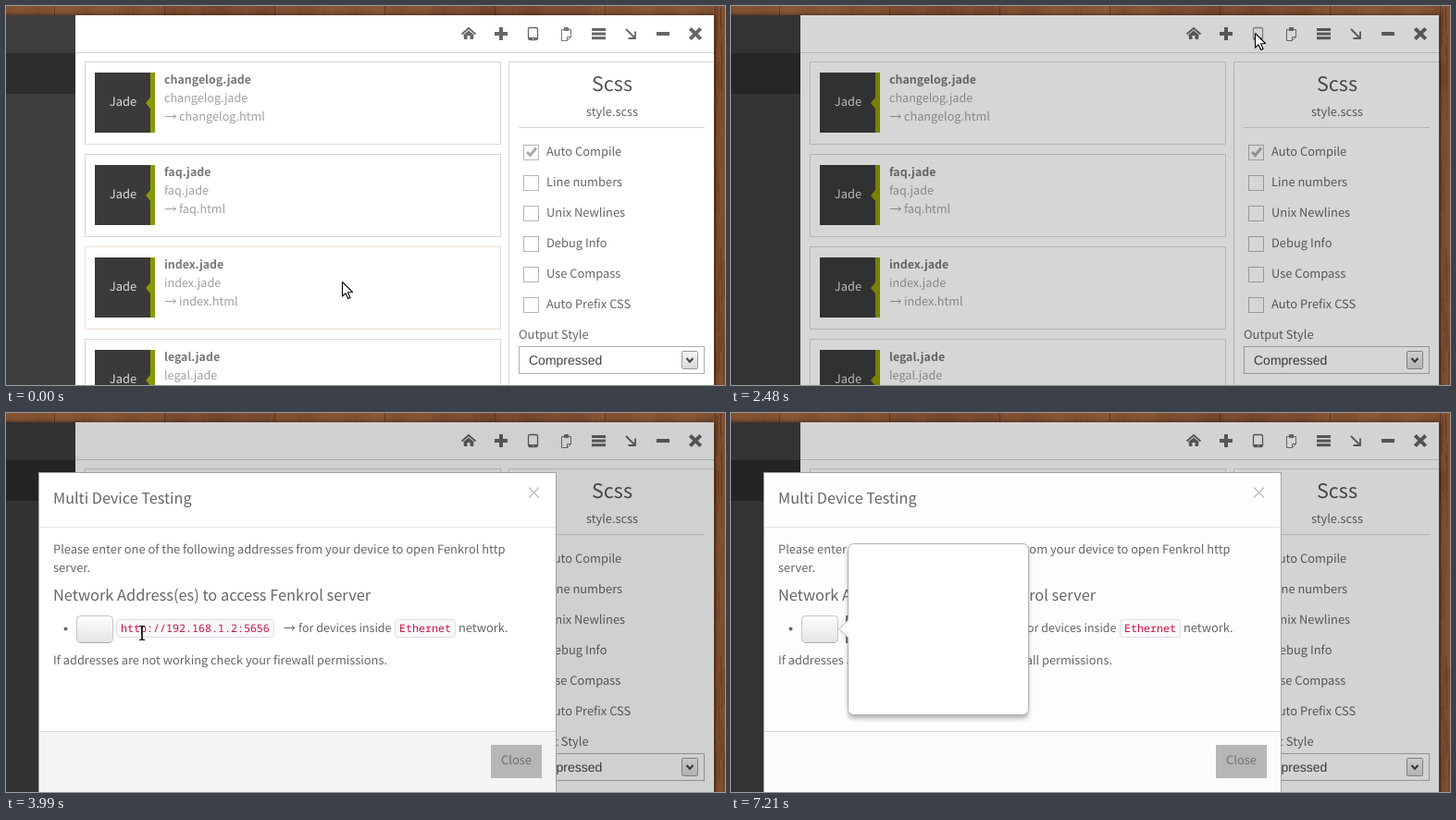
An HTML page with a canvas that plays this animation: 777 by 410 pixels, repeating every 7.29 s.

```html
<!DOCTYPE html>
<html lang="en">
<head>
<meta charset="utf-8">
<title>Multi Device Testing</title>
<style>
html, body { margin: 0; width: 100%; height: 100%; overflow: hidden; background: #6b4026; }
canvas { display: block; }
</style>
</head>
<body>
<canvas id="stage" width="777" height="410"></canvas>
<script>
const W = 777, H = 410, LOOP = 7290;
const SANS = '"Source Sans Pro", "Noto Sans CJK JP", "Noto Sans CJK SC", "Noto Sans CJK", "Noto Sans", sans-serif';
const MONO = '"Noto Sans Mono", "DejaVu Sans Mono", monospace';
const ARIAL = '"Liberation Sans", Arial, sans-serif';
const BODY = 12.9, GREY = '#666', RULE = '#d6d6d6';

// When things happen, in ms
const MOVE = 990, STEP = 135, DIM = 2355, OPEN = 2560, DRAG = 4245, DROP = 4650, POPUP = 5280, BLUR = 7200;

// Turning points of the pointer: time, x, y
const PATH = [[900, 363, 298], [1280, 375, 295], [1530, 624, 136], [1800, 598, 31], [2070, 566, 29],
  [2620, 566, 29], [2745, 567, 40], [3130, 328, 251], [3420, 104, 242], [3690, 217, 241],
  [3960, 147, 238], [DRAG, 124, 230], [DROP, 346, 238], [5070, 102, 236], [5450, 102, 236],
  [5880, 199, 252], [6200, 214, 255], [6640, 538, 398], [6780, 600, 440]];

const makeLayer = c => {
  c.width = W; c.height = H;
  return c.getContext('2d');
};
const stage = makeLayer(document.getElementById('stage'));
const layer = makeLayer(document.createElement('canvas'));
const desk = makeLayer(document.createElement('canvas'));
let g = stage;

const ramp = (t, from, span) => Math.max(0, Math.min(1, (t - from) / span));
const inside = (p, x, y, w, h) => p.x >= x && p.x < x + w && p.y >= y && p.y < y + h;

function rect(x, y, w, h, color) {
  g.fillStyle = color;
  g.fillRect(x, y, w, h);
}
function frame(x, y, w, h, color) {
  g.strokeStyle = color;
  g.lineWidth = 1;
  g.strokeRect(x + .5, y + .5, w - 1, h - 1);
}
function rounded(x, y, w, h, r, fill, stroke, width = 1) {
  g.beginPath();
  g.roundRect(x + .5, y + .5, w - 1, h - 1, r);
  g.lineWidth = width;
  if (fill) { g.fillStyle = fill; g.fill(); }
  if (stroke) { g.strokeStyle = stroke; g.stroke(); }
}
function trace(points) {
  g.beginPath();
  points.forEach(([x, y]) => g.lineTo(x, y));
}
function poly(points, color) {
  trace(points);
  g.closePath();
  g.fillStyle = color;
  g.fill();
}
function line(points, color, width = 1) {
  trace(points);
  g.strokeStyle = color;
  g.lineWidth = width;
  g.stroke();
}
function cross(x, y, r, color, width) {
  line([[x - r, y - r], [x + r, y + r]], color, width);
  line([[x + r, y - r], [x - r, y + r]], color, width);
}
function slope(y0, y1, from, to) {
  const s = g.createLinearGradient(0, y0, 0, y1);
  s.addColorStop(0, from);
  s.addColorStop(1, to);
  return s;
}
function text(str, x, y, color = GREY, size = BODY, opt = {}) {
  g.font = `${opt.weight || 400} ${size}px ${opt.font || SANS}`;
  g.textAlign = opt.align || 'left';
  g.fillStyle = color;
  g.fillText(str, x, y);
}
function arrow(x, y, color) {
  line([[x, y + .5], [x + 11.5, y + .5]], color);
  line([[x + 8.5, y - 2], [x + 11.5, y + .5], [x + 8.5, y + 3]], color);
}
// Draw a group on its own layer and blend it as one.
function fade(alpha, dy, paint) {
  if (alpha <= 0) return;
  g = layer;
  g.clearRect(0, 0, W, H);
  g.save();
  g.translate(0, dy);
  paint();
  g.restore();
  g = stage;
  g.globalAlpha = alpha;
  g.drawImage(layer.canvas, 0, 0);
  g.globalAlpha = 1;
}

function paintDesk() {
  g = desk;
  let seed = 7;
  const rnd = () => (seed = (seed * 16807) % 2147483647) / 2147483647;
  for (let x = 0; x < W; x++) {
    const v = Math.sin(x * .02) * 7 + Math.sin(x * .13) * 4 + rnd() * 6;
    rect(x, 0, 1, H, `rgb(${124 + v},${76 + v * .8},${47 + v * .6})`);
    if (x % 119 === 52) rect(x, 0, 1, H, 'rgba(45,20,8,.4)');
  }
  for (let i = 0; i < 60; i++) {
    rect(766 + rnd() * 11, rnd() * H, 1, 10 + rnd() * 40, `rgba(50,24,10,${rnd() * .3})`);
  }
  g.shadowColor = 'rgba(0,0,0,.6)';
  g.shadowBlur = 5;
  rect(-20, 10, 785, 440, '#fff');
  g.shadowBlur = 0;
  rect(0, 10, 75, 400, '#3d3d3d');
  rect(0, 51, 75, 44, '#2c2c2c');
  g = stage;
}

function toolbar(p) {
  const tint = (x, color) => inside(p, x - 15, 15, 30, 30) ? '#959595' : color;
  // house
  line([[492.5, 30.5], [500, 24], [507.5, 30.5]], GREY, 1.8);
  poly([[494.5, 31], [500, 26.5], [505.5, 31], [505, 36], [495, 36]], GREY);
  rect(498.5, 32, 3, 4, '#fff');
  // plus
  rect(528, 28, 14, 4, GREY);
  rect(533, 23, 4, 14, GREY);
  // tablet
  rounded(564, 23, 11, 14, 1.5, null, tint(570, GREY), 1.3);
  rect(565, 34, 9, 3, tint(570, GREY));
  rect(569, 35, 1.5, 1, '#fff');
  // clipboard
  const clip = tint(605, '#777');
  line([[603, 25.5], [600.5, 25.5], [600.5, 37.5], [606.5, 37.5], [610.5, 33.5], [610.5, 25.5], [608, 25.5]], clip);
  line([[606.5, 37.5], [606.5, 33.5], [610.5, 33.5]], clip);
  rect(603, 23, 5, 4, clip);
  // menu, arrow, minimise, close
  for (let i = 0; i < 3; i++) rect(633, 24 + i * 4.6, 15, 3, GREY);
  line([[670, 25], [679.5, 34.5]], GREY, 1.8);
  line([[680, 27.5], [680, 35], [672.5, 35]], GREY, 1.8);
  rect(703, 28, 14, 4, GREY);
  cross(745, 30, 5.7, GREY, 4);
}

function card(name, y, p) {
  frame(85, y, 450, 90, inside(p, 85, y, 450, 90) ? '#f1ddd2' : RULE);
  rect(96, y + 12, 60, 65, '#3a3a3a');
  rect(156, y + 12, 5, 65, '#8a9a05');
  poly([[156, y + 39], [151, y + 45], [156, y + 51]], '#8a9a05');
  text('Jade', 126.5, y + 48, '#ddd', BODY, { align: 'center' });
  text(name + '.jade', 171, y + 24, '#777', 12.4, { weight: 600 });
  text(name + '.jade', 171, y + 44, '#a0a0a0', 12.6);
  arrow(172, y + 59, '#a0a0a0');
  text(name + '.html', 187, y + 64, '#a0a0a0', 12.7);
}

function sidePanel() {
  line([[765, 60.5], [543.5, 60.5], [543.5, 410]], RULE);
  text('Scss', 655, 92, '#555', 21.5, { align: 'center' });
  text('style.scss', 655, 119, GREY, 12.8, { align: 'center' });
  rect(554, 131, 201, 1, RULE);
  ['Auto Compile', 'Line numbers', 'Unix Newlines', 'Debug Info', 'Use Compass', 'Auto Prefix CSS']
    .forEach((label, i) => {
      frame(559, 150 + i * 33, 17, 17, '#b5b5b5');
      text(label, 584, 162 + i * 33);
    });
  line([[563, 158], [566.5, 161.5], [573, 153.5]], '#aaa', 3);
  text('Output Style', 554, 360);
  frame(554, 368, 201, 30, '#b0b0b0');
  text('Compressed', 565, 388, '#444', 14, { font: ARIAL });
  rounded(730, 373, 18, 20, 1, slope(374, 393, '#f4f4f4', '#d8d8d8'), '#999');
  line([[735.5, 381], [739, 385], [742.5, 381]], '#444', 2);
}

function appWindow(p) {
  rect(75, 50, 690, 1, RULE);
  toolbar(p);
  ['changelog', 'faq', 'index', 'legal'].forEach((name, i) => card(name, 60 + i * 100, p));
  sidePanel();
}

function chip(str, x, w) {
  rounded(x, 223, w, 20, 3, '#f8f8fa', '#dedee4');
  text(str, x + 5, 237, '#c8103f', 11.67, { font: MONO });
}

function modal(marked, hover, focused) {
  rect(35, 64, 560, 347, focused ? '#fff' : '#fdfdfd');
  rect(36, 345, 558, 66, focused ? '#f4f4f4' : '#fbfbfb');
  rect(36, 123, 558, 1, '#e5e5e5');
  rect(36, 344, 558, 1, RULE);
  frame(35, 64, 560, 347, '#a3a3a3');
  text('Multi Device Testing', 51, 98, GREY, 16.2);
  cross(570.5, 86, 5.5, '#bbb', 1.3);

  text('Please enter one of the following addresses from your device to open Fenkrol http', 51, 152);
  text('server.', 51, 172);
  text('Network Address(es) to access Fenkrol server', 51, 203, GREY, 16.4);

  rounded(62, 231, 5, 5, 2, GREY);
  rounded(76, 219, 40, 30, 4, hover ? slope(219, 249, '#e9e9e9', '#dcdcdc') : slope(219, 249, '#fff', '#e4e4e4'), '#c4c4c4');
  rect(80, 248, 32, 1, '#aaa');

  const url = 'http://192.168.1.2:5656';
  chip(url, 119, 171);
  g.save();
  g.beginPath();
  g.rect(124, 219, marked, 30);
  g.clip();
  rect(124, 219, marked, 30, focused ? '#3797fd' : '#6e6e6e');
  text(url, 124, 237, '#fff', 11.67, { font: MONO });
  g.restore();

  arrow(300.5, 232, GREY);
  text('for devices inside', 316, 237, GREY, 12.5);
  chip('Ethernet', 420, 66);
  text('network.', 489, 237);
  text('If addresses are not working check your firewall permissions.', 51, 272, GREY, 12.8);

  rect(524, 359, 55, 36, '#b6b6b6');
  text('Close', 551.5, 380, '#707070', BODY, { align: 'center' });
}

function popover() {
  g.save();
  g.shadowColor = 'rgba(0,0,0,.3)';
  g.shadowBlur = 5;
  g.shadowOffsetY = 4;
  rounded(126, 141, 196, 186, 6, '#fff');
  g.restore();
  rounded(126, 141, 196, 186, 6, '#fff', '#b0b0b0');
  const tip = [[127, 223.5], [117, 233.5], [127, 243.5]];
  poly(tip, '#fff');
  line(tip, '#b0b0b0');
}

const cursors = {
  arrow() {
    const shape = [[.5, .5], [.5, 16], [4, 12.8], [6.6, 18.5], [9, 17.4], [6.5, 11.8], [11.5, 11.5], [.5, .5]];
    poly(shape, '#fff');
    line(shape, '#000', 1.1);
  },
  beam() {
    for (const s of [-1, 1]) line([[-3, 7.5 * s], [-1, 7.5 * s], [0, 6.5 * s], [1, 7.5 * s], [3, 7.5 * s]], '#000', 1.2);
    line([[0, -6.5], [0, 6.5]], '#000', 1.6);
  },
  hand() {
    const parts = (fill, stroke) => {
      for (let i = 0; i < 4; i++) {
        const top = i ? 6 + i : 0;
        rounded(-2 + i * 3, top, 4, 18 - top, 1.5, fill, stroke, 2);
      }
      rounded(-4.5, 11, 5, 6, 2, fill, stroke, 2);
      rounded(-2, 13, 13, 10, 3, fill, stroke, 2);
    };
    parts(null, '#000');
    parts('#fff');
    for (let i = 0; i < 3; i++) rect(1 + i * 3, 9, 1, 4, '#000');
  }
};

function pointerAt(t) {
  const i = Math.max(1, PATH.findIndex(k => k[0] > t));
  if (t >= PATH[PATH.length - 1][0]) return { x: W, y: H };
  const [t0, x0, y0] = PATH[i - 1], [t1, x1, y1] = PATH[i];
  const k = ramp(t, t0, t1 - t0);
  return { x: Math.round(x0 + (x1 - x0) * k), y: Math.round(y0 + (y1 - y0) * k) };
}

function draw(now) {
  const clock = now % LOOP;
  const t = clock < MOVE ? 0 : MOVE + Math.floor((clock - MOVE) / STEP) * STEP;
  const p = pointerAt(t);
  const focused = t < BLUR, open = t > OPEN;
  const onButton = open && inside(p, 76, 219, 40, 30);
  const onText = open && t < POPUP && inside(p, 119, 223, 424, 20);
  const marked = t <= DRAG ? 0 : t < DROP ? Math.min(161, p.x - 124) : 161;

  g.drawImage(desk.canvas, 0, 0);
  appWindow(open ? { x: -1, y: -1 } : p);
  const dim = Math.min(focused ? .183 : .172, ramp(t, DIM, 150) * .2);
  rect(0, 10, 765, 400, `rgba(0,0,0,${dim})`);
  const rise = 1 - ramp(t, OPEN, 330);
  fade(ramp(t, OPEN, 230), Math.round(-60 * rise * rise), () => modal(marked, onButton, focused));
  fade(ramp(t, POPUP, 150), 0, popover);

  g.save();
  g.translate(p.x, p.y);
  g.lineJoin = 'round';
  cursors[onButton ? 'hand' : onText ? 'beam' : 'arrow']();
  g.restore();
}

function loop() {
  draw(performance.now());
  requestAnimationFrame(loop);
}
for (const layerCtx of [stage, layer]) layerCtx.textRendering = 'geometricPrecision';
paintDesk();
loop();
</script>
</body>
</html>
```
